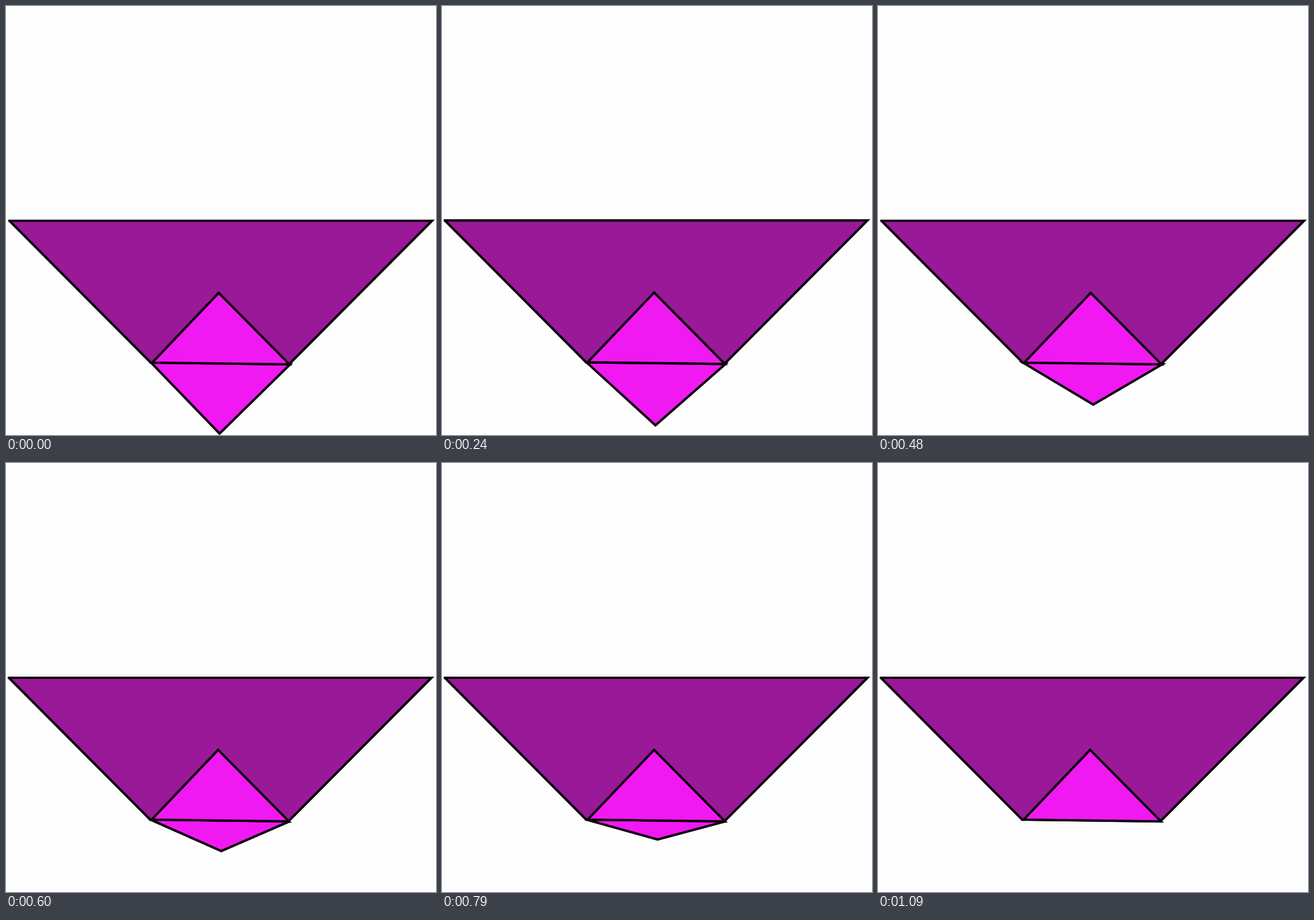
An HTML page that plays this animation: 750x747 px, repeating every 1.55 s.

```html
<!DOCTYPE html>
<html lang="en">
<head>
<meta charset="utf-8">
<title>Folding flap</title>
<style>
  html, body { margin: 0; width: 100%; height: 100%; overflow: hidden; background: #fefefe; }
  svg { display: block; width: 100%; height: 100%; }
</style>
</head>
<body>
<svg viewBox="0 0 750 747">
  <g id="paper" stroke="#0b010b" stroke-width="4.2" stroke-miterlimit="4">
    <polygon id="flap" fill="#f119f1"/>
    <path d="M6 374H743L495 622.5H254Z" fill="#991999" stroke="none"/>
    <path d="M4 374H743L495 622.5M5.5 373.5L253.5 622" fill="none"/>
    <polygon points="371,499.5 255,621 494.5,624" fill="#f119f1"/>
  </g>
</svg>
<script>
  const LOOP = 1550, FOLD_START = 180, SPEED_UP = 690, FOLD_END = 1090;
  const paper = document.getElementById('paper');
  const flap = document.getElementById('flap');

  const clamp = v => Math.min(Math.max(v, 0), 1);

  // Progress from 0 to 1, advancing in equal steps; the first step lands at once.
  const progress = (t, from, to, step) =>
    clamp((Math.floor((t - from) / step) + 1) * step / (to - from + step));

  function draw(time) {
    const t = time % LOOP;
    const first = progress(t, FOLD_START, SPEED_UP - 30, 30);
    const second = progress(t, SPEED_UP + 20, FOLD_END, 20);
    const tipX = 372.5 + 4.5 * first;
    const tipY = 744.5 - 78 * first - 44 * second;
    flap.setAttribute('points', `253,621 495.5,624 ${tipX},${tipY}`);

    // The sheet jolts slightly as the fold begins, and again near its middle.
    const jolt = first > 0 && first < 0.35;
    const settled = first > 0.8;
    paper.setAttribute('transform', `translate(${jolt || settled ? -1 : 0} ${jolt ? -0.6 : 0})`);
  }

  const start = performance.now();
  function tick() {
    draw(performance.now() - start);
    requestAnimationFrame(tick);
  }
  tick();
</script>
</body>
</html>
```
